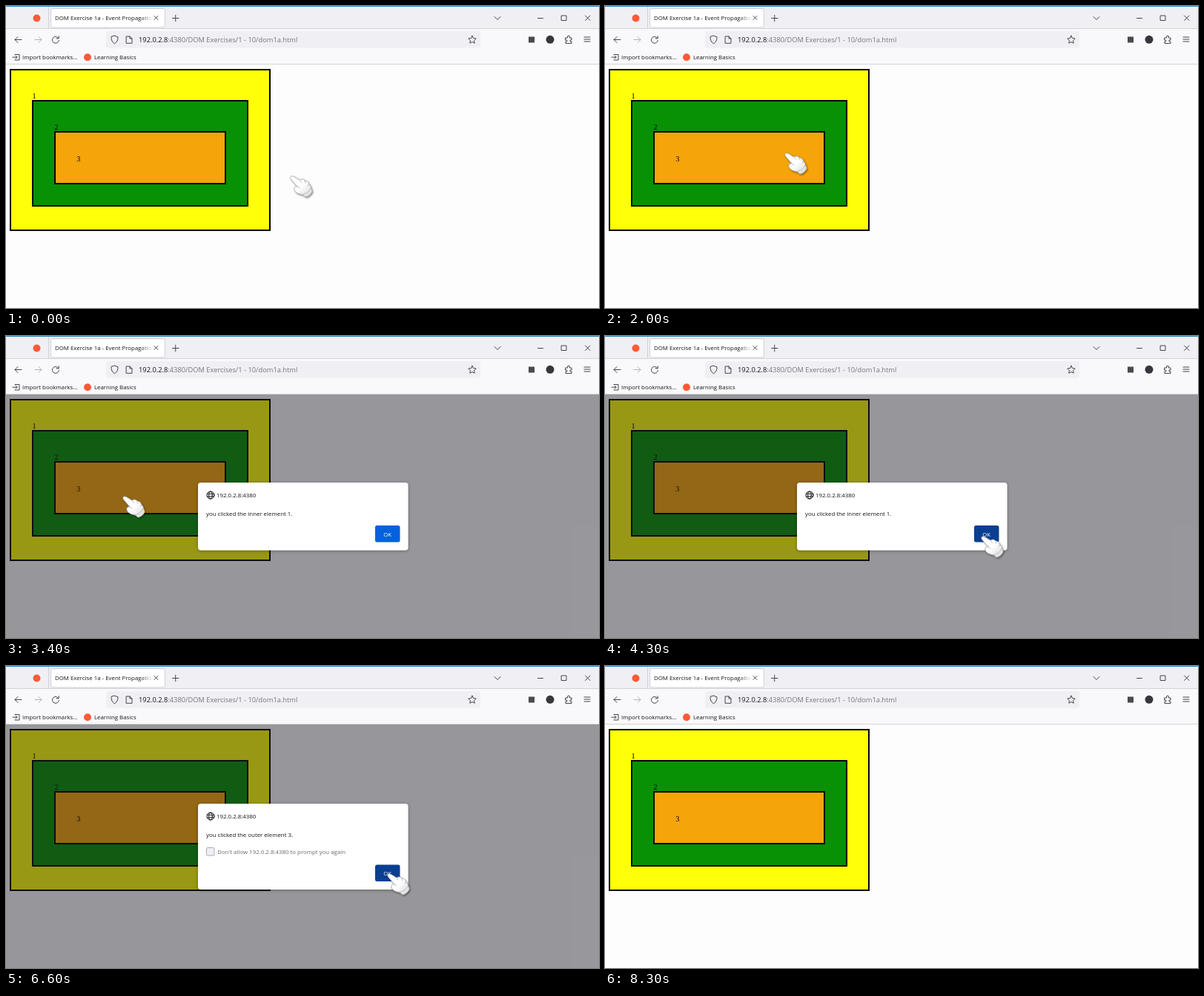
These frames come from a looping animation (800 by 408 pixels, 8.4 s). An HTML page:

```html
<!DOCTYPE html>
<html lang="en">
<head>
<meta charset="utf-8">
<title>Event propagation</title>
<style>
  html, body { margin: 0; width: 100%; height: 100%; overflow: hidden; background: #fdfdfe; }
  svg { display: block; width: 800px; height: 408px; }
  text { font: 7.86px "Open Sans", "Noto Sans", sans-serif; fill: #15141a; white-space: pre; }
  .url { font-size: 9.3px; }
  .digit { font: 10.3px "Liberation Serif", serif; fill: #000; }
  .icon { fill: none; stroke: #45444b; stroke-width: 1; stroke-linecap: round; stroke-linejoin: round; }
  .boxes rect { stroke: #000; stroke-width: 2; }
</style>
</head>
<body>
<svg viewBox="0 0 800 408">
  <defs>
    <linearGradient id="tabFade" gradientUnits="userSpaceOnUse" x1="180" x2="199">
      <stop stop-color="#15141a"/><stop offset="1" stop-color="#15141a" stop-opacity="0"/>
    </linearGradient>
    <linearGradient id="glove" x1="0" y1="0" x2="1" y2="1">
      <stop offset=".5" stop-color="#fff"/><stop offset="1" stop-color="#d4d4d4"/>
    </linearGradient>
    <filter id="soft" x="-20%" y="-20%" width="140%" height="150%">
      <feDropShadow dx="0" dy="1" stdDeviation="2" flood-opacity=".35"/>
    </filter>
    <filter id="handShadow" x="-20%" y="-20%" width="150%" height="150%">
      <feDropShadow dx="1" dy="1.2" stdDeviation=".9" flood-opacity=".5"/>
    </filter>
  </defs>

  <!-- Page -->
  <rect width="800" height="408" fill="#fdfdfe"/>
  <g class="boxes">
    <rect x="6" y="86" width="350" height="217" fill="#ffff0a"/>
    <rect x="36" y="128" width="290" height="142" fill="#089105"/>
    <rect x="66" y="170" width="230" height="70" fill="#f5a50a"/>
  </g>
  <text class="digit" x="35.5" y="125">1</text>
  <text class="digit" x="65.5" y="167">2</text>
  <text class="digit" x="95.3" y="209.5">3</text>
  <rect id="dim" y="79" width="800" height="329" fill="#1c1b22" fill-opacity=".45"/>

  <!-- Tab strip -->
  <rect width="800" height="31" fill="#f0f0f4"/>
  <rect width="800" height="1" fill="#3283bd"/>
  <rect x="57" y="1" width="1" height="29" fill="#d0d0d5"/>
  <circle cx="41.5" cy="16.5" r="5" fill="#ff5a36"/>
  <rect x="60.5" y="3.5" width="154" height="25.5" rx="2.5" fill="#fff" stroke="#c6c6cc" stroke-width=".8"/>
  <text x="66" y="19" fill="url(#tabFade)" style="fill:url(#tabFade)">DOM Exercise 1a - Event Propagation</text>
  <path class="icon" d="M200 13.5l5 5m0-5l-5 5M224.5 16.5h8.5m-4.25-4.25v8.5M659 14.5l4 4 4-4M717.5 16.5h7M749.5 13h6.5v6.5h-6.5zM781.5 13l6.5 6.5m0-6.5l-6.5 6.5"/>

  <!-- Toolbar -->
  <rect y="31" width="800" height="47" fill="#f9f9fb"/>
  <path d="M0 30.5H800M0 78.5H800" stroke="#d3d3d8"/>
  <rect x="135" y="34" width="505" height="22.5" rx="3" fill="#f0f0f4"/>
  <g class="icon">
    <path d="M21 45.5h-9m4-4l-4 4 4 4M70.8 43.5a4.5 4.5 0 1 0 .6 3M71.2 40.7v3.2h-3.2"/>
    <path d="M39 45.5h9m-4-4l4 4-4 4" stroke="#b3b2b8"/>
    <path d="M146.5 40.2l4.5 1.6q.3 6.2-4.5 9-4.8-2.8-4.5-9z"/>
    <path d="M162.5 41h4.5l3 3v6.3h-7.5zM167 41v3h3"/>
    <path d="M629 40.2l1.6 3.3 3.6.5-2.6 2.6.6 3.6-3.2-1.7-3.2 1.7.6-3.6-2.6-2.6 3.6-.5z"/>
    <path d="M755 43h2.7q-.8-3 1.3-3t1.3 3h2.7v3q-2.2-.8-2.2 1t2.2 1v2.5h-8V48q2 .8 2-1t-2-1z"/>
    <path d="M780 42h8m-8 3h8m-8 3h8"/>
    <path d="M12 65.5h6v7.5h-6M9 69.2h6m-2-2l2 2-2 2"/>
  </g>
  <rect x="705" y="41.5" width="8" height="8" fill="#4a494f"/>
  <circle cx="734" cy="45.3" r="5.5" fill="#37363c"/>
  <text class="url" x="179" y="49">192.0.2.8<tspan fill="#76757b" style="fill:#76757b">:4380/DOM Exercises/1 - 10/dom1a.html</tspan></text>
  <text x="22" y="72">Import bookmarks...</text>
  <circle cx="110" cy="69.3" r="5" fill="#ff5a36"/>
  <text x="119" y="72">Learning Basics</text>

  <!-- Alert -->
  <g id="alert">
    <rect id="panel" x="259" width="283.5" rx="4" fill="#fff" filter="url(#soft)"/>
    <g class="icon" style="stroke:#15141a">
      <circle cx="276" cy="17" r="5"/>
      <ellipse cx="276" cy="17" rx="2.3" ry="5"/>
      <path d="M271.3 15.2h9.4m-9.4 3.6h9.4"/>
    </g>
    <text x="284" y="20">192.0.2.8:4380</text>
    <text id="message" x="270" y="44.5"></text>
    <g id="mute">
      <rect x="270.5" y="59.5" width="10.5" height="10.5" rx="1.5" fill="#f0f0f4" stroke="#98979f" stroke-width=".8"/>
      <text x="285.3" y="67.7" style="fill:#6a6970">Don't allow 192.0.2.8:4380 to prompt you again</text>
    </g>
    <g id="ok">
      <rect id="button" x="498" width="33.5" height="22.5" rx="2.5"/>
      <text x="514.7" y="14.5" text-anchor="middle" style="fill:#fff">OK</text>
    </g>
  </g>

  <!-- Pointer, with the fingertip at its origin -->
  <g id="hand" filter="url(#handShadow)">
    <path d="M1 0C4-1 8 3 12 5C15 3 18 4 19 6C23 6 24 9 25 11C28 14 27 16 29 19C30 22 25 27 21 28C18 28 18 25 16 25C11 24 6 22 5 18C4 15 7 13 9 14L1 4.5C-1 2 0 .2 1 0Z"
      fill="url(#glove)" stroke="#999" stroke-width=".7"/>
    <path d="M16 24.5C20 24 26 20 27 16M12 5.5q2 1 2.5 3M18.5 6.5q1.5 1.5 1.5 3M24 11q0 1.5-1 2.5M9 14q2 .3 3 2.5"
      fill="none" stroke="#aaa" stroke-width=".8"/>
  </g>
</svg>
<script>
const LOOP = 8400, STEP = 100, HAND_HIDES = 7800;

// time, x, y
const path = [
  [0, 384, 230], [700, 384, 230], [2000, 243, 199], [2900, 158, 217], [3400, 158, 217],
  [4200, 508, 271], [4700, 508, 271], [5200, 515, 281], [LOOP, 515, 281]
];
const alerts = [
  { from: 3400, press: 4200, to: 4400, top: 198, height: 91.5, text: "you clicked the inner element 1." },
  { from: 4400, press: 5400, to: 5600, top: 186, height: 116, text: "you clicked the middle element 2.", mute: true },
  { from: 5600, press: 6500, to: 6700, top: 186, height: 116, text: "you clicked the outer element 3.", mute: true }
];

const el = id => document.getElementById(id);
const show = (id, visible) => el(id).setAttribute("display", visible ? "inline" : "none");
const move = (id, x, y) => el(id).setAttribute("transform", `translate(${x} ${y})`);

function handAt(t) {
  const i = path.findIndex(([time]) => time > t);
  const [t0, x0, y0] = path[i - 1], [t1, x1, y1] = path[i];
  const p = (t - t0) / (t1 - t0), e = p * p * (3 - 2 * p);
  return [x0 + (x1 - x0) * e, y0 + (y1 - y0) * e];
}

function draw(t) {
  const alert = alerts.find(a => t >= a.from && t < a.to);
  show("dim", alert);
  show("alert", alert);
  if (alert) {
    move("alert", 0, alert.top);
    el("panel").setAttribute("height", alert.height);
    el("message").textContent = alert.text;
    show("mute", alert.mute);
    move("ok", 0, alert.height - 33.5);
    el("button").setAttribute("fill", t >= alert.press ? "#093f91" : "#0561dc");
  }
  show("hand", t < HAND_HIDES);
  move("hand", ...handAt(t));
}

const start = performance.now();
function tick() {
  const t = Math.max(0, performance.now() - start) % LOOP;
  draw(Math.floor(t / STEP) * STEP);
  requestAnimationFrame(tick);
}
tick();
</script>
</body>
</html>
```
